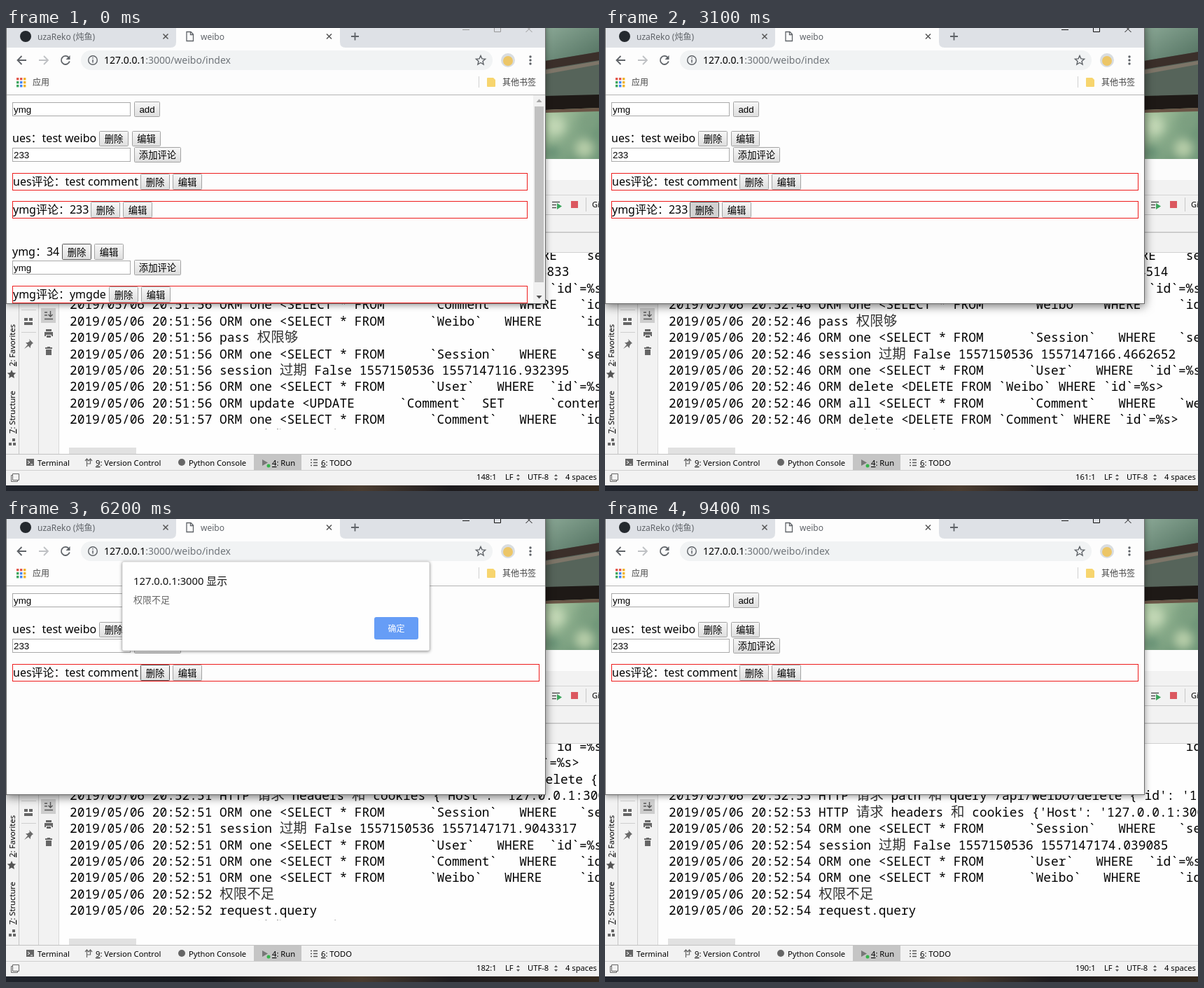
Recreate the animation shown at these times as an HTML page. Size 847 by 661 pixels, loop 9500 ms.

```html
<!DOCTYPE html>
<html lang="zh-CN">
<head>
<meta charset="utf-8">
<title>weibo</title>
<style>
html, body { margin: 0; width: 100%; height: 100%; overflow: hidden; background: #f2f2f2; }
svg { display: block; width: 847px; height: 661px; }
text { font-family: 'Noto Sans', 'Noto Sans CJK SC', sans-serif; fill: #000; }
.log text { font: 17.85px 'Noto Sans Mono', 'Noto Sans CJK SC', monospace; }
.log tspan { font-size: 19.5px; font-weight: 300; fill: #333; }
.form { font: 13.33px 'Liberation Sans', 'Noto Sans CJK SC', sans-serif; }
.ide text { font-size: 11.2px; }
.btn rect { fill: url(#face); stroke: #a3a3a3; }
.btn.hot rect { stroke: #555; }
.btn.down rect { fill: #d2d2d2; }
.box { fill: none; stroke: #ee1c1c; }
.line { fill: none; stroke: #5f6368; stroke-width: 1.8; }
.u { text-decoration: underline; }
#frame { filter: drop-shadow(0 2px 4px rgba(0,0,0,.4)); }
#frame.active { filter: drop-shadow(0 3px 7px rgba(0,0,0,.55)); }
#dialog > rect:first-child { filter: drop-shadow(0 1px 2px rgba(0,0,0,.45)); }
</style>
</head>
<body>
<svg id="stage" viewBox="0 0 847 661"></svg>
<script>
const LOOP = 9500, ROW = 23.42, FIRST = 138;

// Drawing helpers
const rect = (x, y, w, h, fill, more = '') =>
  `<rect x="${x}" y="${y}" width="${w}" height="${h}" fill="${fill}" ${more}/>`;
const text = (x, y, s, more = '') =>
  `<text x="${x}" y="${y}" ${more}>${s}</text>`;
const path = (d, more = 'class="line"') => `<path d="${d}" ${more}/>`;
const circle = (x, y, r, fill) => `<circle cx="${x}" cy="${y}" r="${r}" fill="${fill}"/>`;
const solid = c => `fill="${c}"`;
const stroke = (c, w = 1) => `fill="none" stroke="${c}" stroke-width="${w}"`;
const size = (n, c = '#111') => `style="font-size:${n}px;fill:${c}"`;
const body = size(16, '#000');

const button = (x, y, w, h, label, id = '') =>
  `<g class="btn" ${id && `id="${id}"`}>${rect(x + .5, y + .5, w - 1, h - 1, '#eee', 'rx="1"')}` +
  text(x + w / 2, y + h / 2 + 5, label, 'class="form" text-anchor="middle"') + '</g>';
const input = (y, value) =>
  rect(9.5, y + .5, 168, 19, '#fff', 'stroke="#a9a9a9"') + text(11, y + 15, value, 'class="form"');
const edits = (x, y, id) => button(x, y, 42, 23, '删除', id) + button(x + 46, y, 42, 23, '编辑');
const comment = (y, who, say, x, id) =>
  `<rect class="box" x="9.5" y="${y + .5}" width="735" height="24"/>` +
  text(10, y + 18, `${who}评论：${say}`, body) + edits(x, y + 1, id);

// Console log: one letter per line
const select = (table, gap, field, verb = 'one') =>
  `ORM ${verb} <SELECT * FROM      \`${table}\`   WHERE${' '.repeat(gap)}\`${field}\`=%s LIMIT 1>`;
const remove = table => `ORM delete <DELETE FROM \`${table}\` WHERE \`id\`=%s>`;
const request = route => `HTTP 请求 path 和 query /api/${route}/delete {'id': '1'}`;
const stamps = ['16.828833', '16.932395', '66.344514', '66.4662652',
  '69.173184', '69.2858903', '71.9043317', '74.039085'];
const entry = {
  S: () => select('Session', 3, 'session_id'),
  X: () => 'session 过期 False 1557150536 15571471' + stamps.shift(),
  U: () => select('User', 2, 'id'),
  C: () => select('Comment', 3, 'id'),
  W: () => select('Weibo', 5, 'id'),
  A: () => select('Comment', 3, 'weibo_id', 'all'),
  M: () => 'ORM update <UPDATE      `Comment`  SET      `content`=%s WHERE `id`=%s>',
  D: () => remove('Comment'),
  d: () => remove('Weibo'),
  H: () => request('weibo'),
  h: () => request('weibo/comment'),
  K: () => "HTTP 请求 headers 和 cookies {'Host': '127.0.0.1:3000'",
  P: () => 'pass 权限够',
  N: () => '权限不足',
  R: () => 'request.query'
};
const runs = [['51:56', 'SXUCWPSXUM'], ['51:57', 'C'], ['52:46', 'HKSXUWPSXUdAD'],
  ['52:49', 'hKSXUCWPSXUD'], ['52:51', 'hKSXUCW'], ['52:52', 'NR'],
  ['52:53', 'HK'], ['52:54', 'SXUWNR']];
const log = runs.flatMap(([time, codes]) =>
  [...codes].map(c => `2019/05/06 20:${time} ${entry[c]()}`));
const logRow = (s, i) => text(91, 331 + i * ROW, s.replace(/</g, '&lt;').replace(/ /g, '\u00a0')
  .replace(/[\u4e00-\u9fff]+/g, '<tspan>$&</tspan>'));

// The console clip ends below the newest line, so later lines stay hidden
const defs = `<defs>
<linearGradient id="face" x2="0" y2="1"><stop stop-color="#f7f7f7"/><stop offset="1" stop-color="#dedede"/></linearGradient>
<linearGradient id="leaf" x2=".6" y2="1"><stop stop-color="#86a888"/><stop offset=".5" stop-color="#a9c6a0"/><stop offset="1" stop-color="#6f9678"/></linearGradient>
<linearGradient id="sky" x2="1" y2="1"><stop stop-color="#8aa795"/><stop offset="1" stop-color="#51705f"/></linearGradient>
<linearGradient id="task"><stop stop-color="#20242c"/><stop offset=".35" stop-color="#15171c"/><stop offset=".6" stop-color="#4a3c30"/><stop offset=".75" stop-color="#1d1b1e"/><stop offset="1" stop-color="#33291f"/></linearGradient>
<clipPath id="console"><rect x="76" y="321" width="771" height="252"/></clipPath>
<clipPath id="page"><rect x="1" y="96" width="769" height="297"/></clipPath>
<filter id="soft"><feGaussianBlur stdDeviation="7"/></filter>
<clipPath id="photo"><rect x="770" width="77" height="187"/></clipPath></defs>`;

const photo = '<g clip-path="url(#photo)">' + rect(770, 0, 77, 187, 'url(#leaf)') +
  rect(770, 0, 77, 48, 'url(#sky)') +
  '<g filter="url(#soft)">' + circle(785, 140, 14, '#c3d8b6') + circle(832, 134, 13, '#7c9f80') +
  circle(826, 172, 14, '#b7cea9') + circle(780, 178, 10, '#5f8a70') + '</g>' +
  path('M770 47L847 34V100L770 102Z', solid('#56645a')) +
  path('M770 47L847 34V46L770 59Z', solid('#3b2f2a')) +
  path('M770 60L847 47V52L770 66Z', solid('#7d7568')) +
  path('M770 97L847 95V114L770 117Z', solid('#1e1916')) +
  path('M770 117L847 114V119L770 121Z', solid('#6a5546')) + '</g>';

const updown = x => path(`M${x} 640l2.5-3 2.5 3zM${x} 643l2.5 3 2.5-3z`, solid('#555'));
const side = (y, key, label) =>
  text(0, 0, `<tspan class="u">${key}</tspan>: ${label}`, `transform="translate(13 ${y})rotate(-90)"`);
const tool = (x, key, label) => text(x, 625, `<tspan class="u">${key}</tspan>: ${label}`);

const ide = '<g class="ide">' +
  rect(0, 187, 847, 474, '#f2f2f2') + rect(770, 187, 77, 30, '#fcfcfc') +
  rect(770, 238, 77, 1, '#d4d4d4') + rect(770, 266, 77, 1, '#c4c4c4') +
  rect(770, 291, 77, 1, '#b9b9b9') + rect(770, 292, 77, 1, '#e4e4e4') +
  path('M780 248.5h11M780 252.5h6M780 256.5h6', stroke('#555', 1.5)) +
  path('M787 250l7 4.500-7 4.500z', solid('#3ca55c')) + rect(807, 247, 10, 10, '#db5860') +
  rect(828, 242, 1, 20, '#c8c8c8') + text(837, 256, 'Git:') +
  rect(76, 321, 771, 287, '#fefefe') + rect(770, 320, 77, 1, '#d2d2d2') +
  rect(18, 393, 1, 215, '#c6c6c6') + rect(46, 393, 1, 215, '#cfcfcf') + rect(75, 393, 1, 215, '#d8d8d8') +
  rect(22, 402, 21, 1, '#cfcfcf') + rect(22, 434, 21, 1, '#cfcfcf') +
  side(483, 2, 'Favorites') + side(579, 7, 'Structure') +
  path('M8 488l1.900 4 4.300.500-3.200 3 .9 4.400-3.900-2.200-3.900 2.200.9-4.400-3.200-3 4.300-.5z', solid('#555')) +
  path('M9 586h4v4h-4zM4 592h4v4H4zM10 592h4v4h-4z', solid('#666')) +
  path('M26 414h5v4h-5zM33 414h5v4h-5zM26 420h12v4H26z', solid('#666')) +
  path('M33 444l6 6-2 1-2 3 0 3-3-3-6 4 5-6-3-3 3 0 3-2z', solid('#6a6a6a')) +
  rect(50, 400, 21, 21, '#cdcdcd') +
  path('M55 406h4M55 410h4M55 415.500h12M63.500 404v8M60.500 409l3 3 3-3', stroke('#555', 1.4)) +
  path('M57 430h8v3h-8zM55 434h12v6h-2v-2h-8v2h-2zM58 439h6v3h-6z', solid('#666')) +
  path('M56 456h3v-1h4v1h3v2H56zM57 459h8v8h-8z', solid('#666')) +
  rect(90, 599, 96, 9, '#e1e1e1') +
  rect(0, 608, 847, 1, '#c3c3c3') + rect(354, 609, 68, 22, '#c5c5c5') + rect(0, 631, 847, 1, '#cfcfcf') +
  rect(29, 615, 11, 10, '#666') + path('M31 618l3 2-3 2M35 623h3', stroke('#fff')) +
  text(45, 625, 'Terminal') +
  path('M115.500 615v11M115.500 622h5v-6M113 618l2.500-3 2.500 3M118 618l2.500-3 2.500 3', stroke('#666', 1.2)) +
  tool(128, 9, 'Version Control') +
  circle(251, 620, 5, '#666') + text(261, 625, 'Python Console') +
  path('M366 616l8 4.500-8 4.500z', solid('#777')) + circle(375, 625, 2.5, '#35b44a') + tool(380, 4, 'Run') +
  path('M435 616.500h2M439 616.500h6M435 620.500h2M439 620.500h6M435 624.500h2M439 624.500h6', stroke('#555', 1.3)) +
  tool(450, 6, 'TODO') +
  path('M9.500 636.500h9v9h-9zM9.500 638.500h-2v9h9v-2', stroke('#666')) +
  text(672, 645, '', 'id="pos"') + text(713, 645, 'LF') + updown(729) +
  text(745, 645, 'UTF-8') + updown(783) + text(799, 645, '4 spaces') +
  rect(0, 653, 847, 8, 'url(#task)') + '</g>' +
  `<g class="log" clip-path="url(#console)"><g id="rows">${log.map(logRow).join('')}</g></g>`;

const cross = (x, y, r) => `M${x - r} ${y - r}l${2 * r} ${2 * r}M${x + r} ${y - r}l${-2 * r} ${2 * r}`;
const palette = ['#e2574c', '#e2574c', '#f0b429', '#3ba55d', '#4285f4', '#f0b429', '#3ba55d', '#4285f4', '#f0b429'];
const apps = palette.map((c, i) => rect(15 + i % 3 * 5, 71 + (i / 3 | 0) * 5, 3.4, 3.4, c)).join('');

const chrome = `<g id="frame">${rect(0, -12, 771, 406, '#6b6b6b')}</g>` +
  rect(1, 0, 769, 28, '#dee1e6') + rect(1, 28, 769, 365, '#fdfdfd') +
  path('M235 28q8 0 8-8V0H477V20q0 8 8 8z', solid('#fdfdfd')) +
  circle(28, 12, 8, '#24292e') + text(45, 17, 'uzaReko (炖鱼)', size(12, '#5f6368')) +
  path(cross(228, 12, 3.5) + cross(461.5, 12, 3.5), stroke('#555', 1.5)) +
  path('M258 5.500h6l3.500 3.500v9.500h-9.500zM263.500 5.500v4h4', stroke('#5f6368', 1.3)) +
  text(278, 17, 'weibo', size(12, '#5f6368')) + path('M493 12h11M498.500 6.500v11') +
  `<g id="controls">${path('M652 2.500h10M697.500-4v9.500h9V-4' + cross(747, 1.5, 4.5), 'fill="none" stroke="currentColor"')}</g>` +
  path('M29 46H17M22.500 40l-6 6 6 6') + path('M47 46h12M54 40l6 6-6 6', stroke('#bfc1c4', 1.8)) +
  path('M89.500 42a6 6 0 1 0 1.300 5.500') + path('M91.500 39v6h-6z', solid('#5f6368')) +
  rect(107, 32, 588, 28, '#f1f3f4', 'rx="14"') +
  `<circle cx="124" cy="46" r="6.300" ${stroke('#5f6368', 1.4)}/>` + path('M124 45v4.500M124 42v1.500', stroke('#5f6368', 1.5)) +
  text(140, 51, '127.0.0.1<tspan fill="#70757a">:3000/weibo/index</tspan>', 'style="font-size:14px"') +
  path('M678 39.500l1.900 4.400 4.700.400-3.600 3.100 1.100 4.600-4.100-2.500-4.100 2.500 1.100-4.600-3.600-3.100 4.700-.4z', stroke('#5f6368', 1.4)) +
  circle(717, 46, 10, '#d9dde0') + circle(717, 47, 7, '#ecc667') +
  [41, 46, 51].map(y => circle(749, y, 1.7, '#5f6368')).join('') +
  apps + text(38, 82, '应用', size(12, '#444')) + rect(675, 69, 1, 16, '#d0d0d0') +
  path('M687 72q0-1 1-1h8l3 3v9q0 1-1 1h-10q-1 0-1-1z', solid('#f7d56e')) +
  text(709, 82, '其他书签', size(12, '#444')) + rect(1, 95, 769, 1, '#b4b4b4');

const page = '<g clip-path="url(#page)">' +
  input(106, 'ymg') + button(183, 105, 37, 22, 'add') +
  text(9, 163, 'ues：test weibo', body) +
  button(133, 147, 42, 22, '删除', 'postDel') + button(180, 147, 41, 22, '编辑', 'postEdit') +
  input(171, '233') + button(183, 170, 67, 22, '添加评论') +
  comment(207, 'ues', 'test comment', 192, 'firstDel') +
  `<g id="second">${comment(247, 'ymg', '233', 121, 'secondDel')}</g>` +
  '<g id="lower">' + text(9, 325, 'ymg：34', body) + edits(80, 308, 'lowerDel') +
  input(332, 'ymg') + button(183, 331, 67, 22, '添加评论') +
  comment(368, 'ymg', 'ymgde', 147) +
  rect(753, 96, 17, 297, '#f1f1f1') + rect(755, 112, 13, 251, '#c1c1c1') +
  path('M757.500 106h8l-4-4.500z', solid('#a3a3a3')) + path('M757.500 382h8l-4 4.500z', solid('#505050')) + '</g></g>';

const dialog = '<g id="dialog">' + rect(166, 61, 439, 127, '#fefefe', 'rx="2" stroke="#c4c4c4" stroke-width=".6"') +
  text(182, 94, '127.0.0.1:3000 显示', size(14.8)) + text(182, 120, '', `id="msg" ${size(13, '#666')}`) +
  rect(526, 140, 63, 32, '#669df6', 'rx="3" id="ok"') +
  text(557.500, 161, '确定', `text-anchor="middle" ${size(12, '#fff')}`) + '</g>';

document.getElementById('stage').innerHTML = defs + photo + ide + chrome + page + dialog;
const $ = id => document.getElementById(id);

// Each track is a list of [start ms, value]
const tracks = {
  line: [[0, 148], [900, 150], [1000, 156], [1100, 161], [3400, 167], [3500, 172], [3600, 173],
    [5900, 176], [6000, 181], [6100, 182], [7900, 187], [8000, 190]],
  shown: [[0, 0], [1200, .7], [1300, 1], [2200, .4], [2300, 0], [3600, .6], [3700, 1], [4400, .5], [4500, 0],
    [6100, .7], [6200, 1], [6900, .4], [7000, 0], [8000, .6], [8100, 1], [8700, .5], [8800, 0]],
  msg: [[0, '成功删除 weibo'], [3400, '成功删除评论'], [5900, '权限不足']],
  ok: [[0, '#669df6'], [2100, '#6fa3f7'], [3400, '#669df6'], [6800, '#6fa3f7'], [7900, '#669df6'], [8300, '#6fa3f7']],
  lower: [[0, 1], [2300, 0]],
  second: [[0, 1], [4600, 0]],
  hot: [[0, 'lowerDel'], [2300, ''], [2800, 'secondDel'], [4600, ''], [5400, 'firstDel'],
    [7100, ''], [7300, 'postEdit'], [7400, 'postDel'], [8900, '']],
  down: [[0, ''], [3100, 'secondDel'], [3200, ''], [5600, 'firstDel'], [5700, ''], [7600, 'postDel'], [7700, '']],
  controls: [[0, '#999'], [500, '#555'], [600, '#111']],
  active: [[0, 0], [500, 1], [9400, 0]]
};
const at = (track, t) => track.findLast(([start]) => start <= t)[1];
const buttons = [...document.querySelectorAll('.btn[id]')];
const boxes = [...document.querySelectorAll('.box')];
let last = '';

function draw(t) {
  const s = Object.fromEntries(Object.entries(tracks).map(([k, v]) => [k, at(v, t)]));
  const key = JSON.stringify(s);
  if (key === last) return;
  last = key;
  $('rows').setAttribute('transform', `translate(0 ${(FIRST + 10 - s.line) * ROW})`);
  $('pos').textContent = s.line + ':1';
  $('dialog').style.opacity = s.shown;
  $('msg').textContent = s.msg;
  $('ok').setAttribute('fill', s.ok);
  for (const id of ['lower', 'second']) $(id).style.display = s[id] ? '' : 'none';
  for (const b of boxes) b.setAttribute('width', s.lower ? 735 : 752);
  for (const b of buttons) {
    b.classList.toggle('hot', b.id === s.hot);
    b.classList.toggle('down', b.id === s.down);
  }
  $('controls').style.color = s.controls;
  $('frame').classList.toggle('active', !!s.active);
}

const begin = performance.now();
function tick() {
  draw((performance.now() - begin) % LOOP);
  requestAnimationFrame(tick);
}
tick();
</script>
</body>
</html>
```
